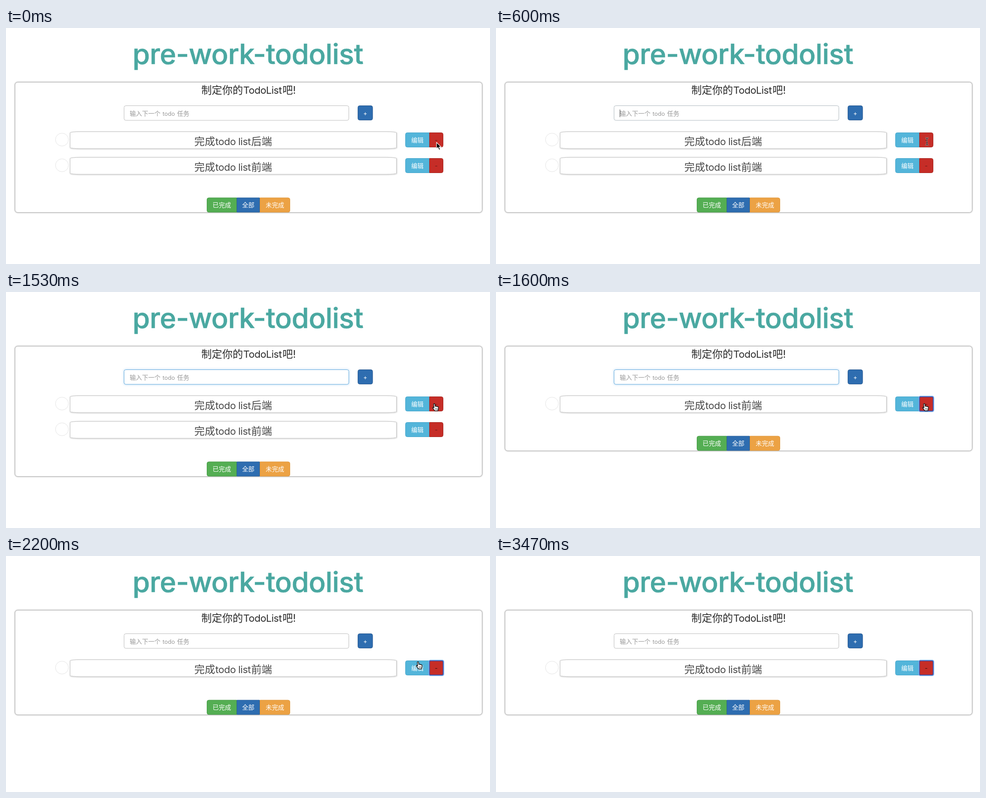
Recreate the animation shown at these times as an HTML page. Size 1068x524 px, loop 3.54 s.

```html
<!DOCTYPE html>
<html lang="zh-CN">
<head>
<meta charset="utf-8">
<title>pre-work-todolist</title>
<style>
  html, body { margin: 0; width: 100%; height: 100%; overflow: hidden; background: #fff; }
  svg { display: block; width: 100%; height: 100%; font-family: Inter, 'Noto Sans CJK SC', 'Noto Sans CJK', sans-serif; }
  .title { font-size: 62px; font-weight: 500; letter-spacing: -.58px; fill: #4aa8a1; stroke: #4aa8a1; stroke-width: .7; text-anchor: middle; }
  .big { font-size: 23px; }
  .big .latin { font-size: 22px; letter-spacing: -.5px; }
  .hint { font-size: 13.6px; fill: #999; }
  .hint .latin { font-size: 12.8px; }
  .label { font-size: 13.6px; fill: #fff; text-anchor: middle; }
</style>
</head>
<body>
<svg id="stage" viewBox="0 0 1068 524" xmlns="http://www.w3.org/2000/svg">
  <defs>
    <filter id="soft" x="-10%" y="-30%" width="120%" height="160%"><feGaussianBlur stdDeviation="1.2"/></filter>
    <filter id="glow" x="-10%" y="-60%" width="120%" height="220%"><feGaussianBlur stdDeviation="2"/></filter>
  </defs>
  <text class="title" x="533.8" y="80">pre-work-todolist</text>

  <rect id="panelShade" x="20" y="120.5" width="1030.5" rx="6" fill="none" stroke="#b0b0b0" stroke-width="2" filter="url(#soft)"/>
  <rect id="panel" x="20" y="120.5" width="1030.5" rx="6" fill="#fff" stroke="#b6b6b6"/>
  <text class="big" x="431" y="145.5" fill="#2b2b2b">制定你的<tspan class="latin" x="523.5" style="letter-spacing:-.5px">TodoList</tspan><tspan x="610">吧!</tspan></text>

  <rect id="inputGlow" x="260.5" y="172.5" width="496" height="32.5" rx="4" fill="none" stroke="#66afe9" stroke-width="3" filter="url(#glow)"/>
  <rect id="input" x="260.5" y="172.5" width="496" height="32.5" rx="4" fill="#fff"/>
  <text class="hint" x="273" y="194.5">输入下一个<tspan class="latin" x="345.5">todo</tspan><tspan x="377.5">任务</tspan></text>
  <path id="caret" d="M273.5 181V198" stroke="#444"/>

  <g id="rows"></g>
  <g id="filters"></g>
  <g id="ring" fill="none">
    <rect x="933" y="231.4" width="33" height="34.2" rx="3.5" stroke="#79aef0" stroke-width="1.8"/>
    <rect x="934.5" y="232.8" width="30" height="31.4" rx="2.5" stroke="#3a4fa6" stroke-width="1.5"/>
  </g>

  <g id="cursor" stroke-linejoin="round">
    <path id="arrow" d="M0 0V14.2L3.2 11.2 5.6 16.8 8.2 15.7 5.8 10.2H10.2Z" fill="#000" stroke="#fff" stroke-width="1.2"/>
    <g id="beam" fill="none">
      <path d="M-3.5-8Q0-8 0-5.5Q0-8 3.5-8M0-6V6M-3.5 8Q0 8 0 5.5Q0 8 3.5 8M-2 3H2" stroke="#ddd" stroke-opacity=".55" stroke-width="2.8"/>
      <path d="M-3.5-8Q0-8 0-5.5Q0-8 3.5-8M0-6V6M-3.5 8Q0 8 0 5.5Q0 8 3.5 8M-2 3H2" stroke="#222" stroke-width="1.2"/>
    </g>
    <g id="hand">
      <path d="M-1.5 1.2C-1.5-.6 1.2-.6 1.4 1L2 6C2.3 4.8 4.4 4.9 4.7 6.2C5.4 5.3 7 5.6 7.2 6.9C8 6.3 9.3 6.8 9.3 8C9.3 11 8.6 13 7.8 15.8H1C.2 13.5-2 12-3.6 9.4C-4.2 8-2.7 7.4-1.6 8.4L-.6 9.4Z" fill="#fff" stroke="#111" stroke-width="1.4"/>
      <path d="M2.6 10.2V13.4M4.6 10.2V13.4M6.6 10.2V13.4" stroke="#111" stroke-width=".8"/>
    </g>
  </g>
</svg>
<script>
const $ = id => document.getElementById(id);
const LOOP = 3540, STEP = 200 / 3, ROW = 57;
const CLICK = 1590, FOCUS = 570, FADE = 150;

// Button outline with separate left and right corner radii.
function button(x, y, w, fill, edge, label, left = 4, right = 4, ink = '#fff') {
  const h = 32, d = `M${x + left} ${y}h${w - left - right}q${right} 0 ${right} ${right}v${h - 2 * right}` +
    `q0 ${right} ${-right} ${right}h${left + right - w}q${-left} 0 ${-left} ${-left}v${2 * left - h}q0 ${-left} ${left} ${-left}z`;
  return `<path d="${d}" fill="${fill}" stroke="${edge}"/>` +
    `<text class="label" x="${x + w / 2}" y="${y + 21}" style="fill:${ink}">${label}</text>`;
}

function row(id, part) {
  const box = 'M141.5 232.5Q143 230.5 165 230.2H838Q860 230.5 861.5 232.5V265.5Q860 267.5 838 267.8H165Q143 267.5 141.5 265.5Z';
  return `<g id="${id}">
    <circle cx="123.5" cy="247.8" r="14.3" fill="#fff" stroke="#e4e4e4"/>
    <path d="${box}" transform="translate(.6 .8)" fill="none" stroke="#bbb" stroke-width="1.4" filter="url(#soft)"/>
    <path d="${box}" fill="#fff" stroke="#c2c2c2"/>
    <text class="big" x="415.5" y="259.8" fill="#484848">完成<tspan class="latin" x="462">todo list</tspan><tspan x="541">${part}</tspan></text>
    ${button(881.5, 232.5, 52.5, '#53b5da', '#46a6cc', '编辑', 4, 0)}
    ${button(934.5, 232.5, 30, '#c62d27', '#a32520', '-', 0, 4, '#651a17')}
  </g>`;
}

$('rows').innerHTML = row('back', '后端') + row('front', '前端');
$('filters').innerHTML =
  button(443.5, 377, 65.5, '#54ae53', '#479a46', '已完成', 4, 0) +
  button(509.5, 377, 50, '#2e6db0', '#28609c', '全部', 0, 0) +
  button(560.5, 377, 66, '#eca244', '#e0983c', '未完成', 0, 4);
$('input').insertAdjacentHTML('afterend', button(776.5, 172.5, 32.5, '#2e6db0', '#27578f', '+'));
const minus = $('front').querySelectorAll('text')[2];

const clamp = v => Math.max(0, Math.min(1, v));
const mix = (a, b, k) => a + (b - a) * k;
const ease = k => k * k * (3 - 2 * k);
const show = (id, on) => $(id).setAttribute('visibility', on ? 'visible' : 'hidden');
const shift = (id, x, y) => $(id).setAttribute('transform', `translate(${x} ${y})`);

// Pointer keys: time, x, y.
const path = [[0, 950, 254], [540, 950, 254], [600, 951, 252], [670, 951, 252], [730, 946, 250],
  [1130, 946, 250], [1600, 945, 248], [1800, 945, 248], [2200, 909, 235], [2420, 922, 48]];

function pointer(t) {
  const i = Math.max(1, path.findIndex(p => p[0] >= t));
  const [a, b] = [path[i - 1], path[i]], k = ease(clamp((t - a[0]) / (b[0] - a[0])));
  return [mix(a[1], b[1], k), mix(a[2], b[2], k)];
}

function draw(time) {
  const t = Math.floor((time % LOOP + 4) / STEP) * STEP;
  const removed = t >= CLICK, lift = removed ? -ROW : 0;

  for (const id of ['panel', 'panelShade']) $(id).setAttribute('height', 289 + lift);
  show('back', !removed);
  shift('front', 0, ROW + lift);
  shift('filters', 0, lift);
  show('ring', removed);
  minus.style.fill = removed ? '#38100e' : '#651a17';

  const focus = ease(clamp((t - FOCUS) / FADE)) * (1 - ease(clamp((t - 1600) / FADE)));
  const [r, g, b] = [[188, 92], [188, 166], [188, 220]].map(c => Math.round(mix(c[0], c[1], focus)));
  $('input').setAttribute('stroke', `rgb(${r},${g},${b})`);
  $('inputGlow').setAttribute('opacity', focus * .35);
  show('caret', t >= FOCUS && t < 1100);

  const shape = t < 590 ? 'arrow' : t < 730 ? 'beam' : 'hand';
  for (const id of ['arrow', 'beam', 'hand']) show(id, id === shape && t < 2420);
  if (t < 2420) shift('cursor', ...pointer(t));
}

function tick() {
  draw(performance.now());
  requestAnimationFrame(tick);
}
tick();
</script>
</body>
</html>
```
